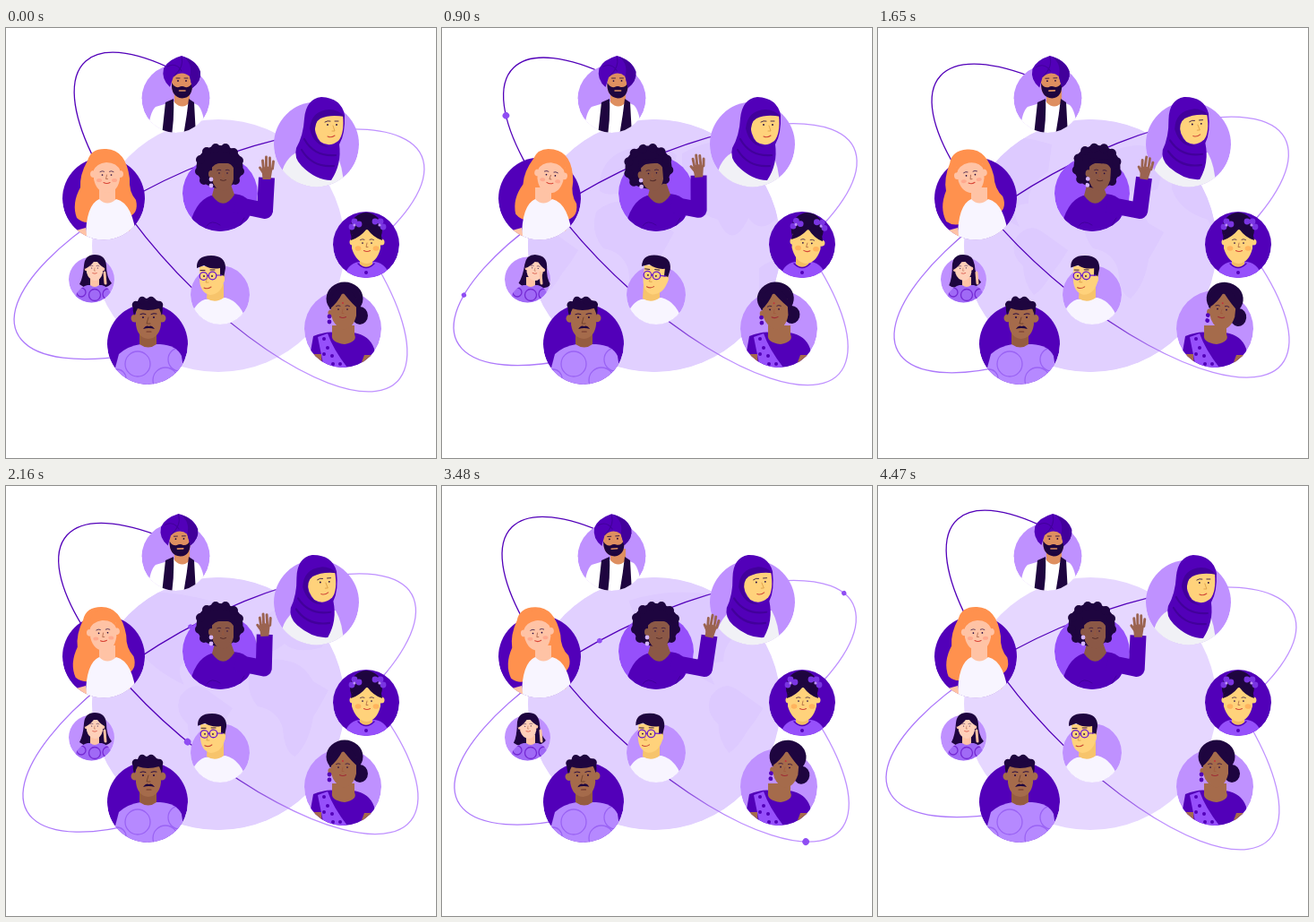
Animation, 480 px wide and 480 px high, one loop 4.5 s. Source, as an HTML page:

```html
<!DOCTYPE html>
<html lang="en">
<head>
<meta charset="utf-8">
<title>People around the globe</title>
<style>
  html, body { margin: 0; width: 100%; height: 100%; overflow: hidden; background: #fff; }
  svg { display: block; width: 100%; height: 100%; }
</style>
</head>
<body>
<svg id="stage" viewBox="0 0 480 480"></svg>
<script>
const LOOP = 4500, TAU = Math.PI * 2;
const DARK = '#5200b9', DEEP = '#42009b', MID = '#9650fb', LIGHT = '#bf91ff', INK = '#1e053f';
const SUN = '#ffd27b', PEACH = '#ffc3a5', TAN = '#de8f60', BROWN = '#8b5846', CLAY = '#a56b4b', WHITE = '#f8f5ff';

// Shape helpers
const path = (d, fill) => `<path d="${d}" fill="${fill}"/>`;
const line = (d, stroke, w = 1) => `<path d="${d}" fill="none" stroke="${stroke}" stroke-width="${w}" stroke-linecap="round" stroke-linejoin="round"/>`;
const oval = (x, y, rx, ry, fill) => `<ellipse cx="${x}" cy="${y}" rx="${rx}" ry="${ry}" fill="${fill}"/>`;
const dots = (list, r, fill) => list.map(([x, y]) => oval(x, y, r, r, fill)).join('');
const rings = (list, stroke) => list.map(([x, y, r]) =>
  `<circle cx="${x}" cy="${y}" r="${r}" fill="none" stroke="${stroke}" stroke-width="1.3"/>`).join('');
const head = (id, art) => `<g id="${id}">${art}</g>`;

// Garment with a ring print that stays inside its outline
const printed = (id, d, fill, list, stroke) => `<clipPath id="${id}"><path d="${d}"/></clipPath>
  ${path(d, fill)}<g clip-path="url(#${id})">${rings(list, stroke)}</g>`;

const face = (x, y, s = 1, lips = '#b5463c') => `<g transform="translate(${x} ${y}) scale(${s})">
  ${dots([[-5, 0], [5, 0]], .85, INK)}
  ${line('M-7.500 -3.500Q-5 -5 -3 -3.800M3 -3.800Q5 -5 7.500 -3.500', INK, .7)}
  ${line('M0 0L-1 4.500H1', '#a0583c', .7)}
  ${line('M-3.500 8.500Q0 10.500 3.500 8.500', lips, 1.1)}</g>`;

// Round badge: art is cut by the lower half of the disc, free above it
const badge = (id, x, y, r, fill, art) => `
  <clipPath id="clip-${id}"><path d="M${x - r} ${y}A${r} ${r} 0 0 0 ${x + r} ${y}H${x + 2 * r}V0H${x - 2 * r}V${y}Z"/></clipPath>
  <g clip-path="url(#clip-${id})">${oval(x, y, r, r, fill)}${art}</g>`;

const people = [
  badge('turban', 189.5, 79, 38, LIGHT,
    path('M158 120Q160 94 167 88L187 82H205L214 86Q221 92 223 120Z', '#fff') +
    path('M188 70H205V83Q197 92 188 83Z', TAN) +
    path('M178 83L187 79Q188 98 185 120H174ZM204 79L210 83L212 120H198Q202 98 204 79Z', INK) +
    head('turban-head',
      path('M185 50H208V67Q206 78 196.500 78Q187 78 185 67Z', TAN) +
      path('M185 61Q188 67 193 66Q196.500 64 200 66Q205 67 208 61Q209 78 196.500 78.500Q184 77 185 61Z', INK) +
      line('M193.500 70H200', TAN, 1.6) +
      dots([[192, 59], [201, 59]], .9, INK) +
      line('M190 56H194M199 56H203', INK, .8) +
      path('M196 31Q181 35 176 45Q173 57 183 66L187 54Q197 47 205 54L208 67Q218 60 217 49Q213 36 196 31Z', DARK) +
      path('M198 32Q209 40 205 54L208 67Q218 60 217 49Q213 37 198 32Z', DEEP) +
      line('M196 32Q199 44 187 54M196 48Q190 38 180 43', DEEP))),

  badge('red', 109, 190.5, 46, DARK,
    head('red-hair', path('M112 135Q95 134 91 148Q82 164 83 178Q73 196 79 212Q90 222 105 212H134Q149 208 145 192Q137 183 138 168Q134 136 112 135Z', '#ff914e')) +
    path('M104 178H122V196Q113 205 104 196Z', PEACH) +
    path('M89 240Q88 198 104 191Q113 200 123 191Q143 196 146 240Z', WHITE) +
    path('M78 226L89 223L91 240H78ZM137 226L147 224V240H138Z', PEACH) +
    head('red-head',
      dots([[98, 163], [127, 163]], 4, PEACH) +
      path('M98 153Q112 143 127 153V169Q124 184 112.500 184Q101 183 98 169Z', PEACH) +
      oval(104, 170, 3, 2, '#ffa98e') + oval(121, 170, 3, 2, '#ffa98e') +
      face(112.5, 164, 1, '#d94436') +
      path('M97 160Q97 140 112 138Q127 140 128 160Q124 150 112 150Q101 151 97 160Z', '#ff914e'))),

  badge('hijab', 346.5, 130, 47.5, LIGHT,
    path('M305 180Q306 149 324 139H368Q377 155 377 180Z', '#f1f1f6') +
    head('hijab-head',
      path('M352 77Q335 79 333 101Q332 120 324 134Q321 145 330 154Q346 170 363 170Q375 152 372 130Q379 118 378 97Q374 78 352 77Z', DARK) +
      path('M344 104Q353 92 376 97Q378 118 371 126Q361 134 351 127Q344 119 344 104Z', SUN) +
      path('M339 112Q341 92 361 91Q371 91 378 99Q362 96 351 101Q344 105 345 118Q348 129 361 133Q343 132 339 112Z', DEEP) +
      line('M330 136Q342 156 366 154M333 124Q344 144 368 142', DEEP, 2.2) +
      dots([[359, 108], [369, 108]], .9, INK) +
      line('M356 105Q359 103 362 104M367 104L371 104', INK, .8) +
      line('M365 109L367 115H364', '#d99a45', .8) +
      line('M359 121Q363 123 367 120', '#d04a3a', 1.1))),

  badge('afro', 239, 185, 42, MID,
    path('M203 232Q208 194 229 187L253 185Q271 186 274 200L266 232Z', DARK) +
    path('M230 187Q243 205 255 186L250 172H234Z', BROWN) +
    line('M224 221Q229 213 239 220M260 222L266 212', DEEP) +
    head('afro-head',
      oval(238.5, 155, 26, 24, INK) +
      dots([[217, 147], [224, 138], [234, 134], [245, 134], [254, 139], [260, 148], [261, 160], [256, 170], [216, 160], [221, 170]], 5, INK) +
      oval(229, 163, 3, 4, BROWN) +
      path('M230 151H254V169Q251 182 242 182Q232 180 230 169Z', BROWN) +
      path('M228 158Q234 149 243 151Q251 149 255 158V146H228Z', INK) +
      face(242.5, 162, .9, '#542c2a') +
      dots([[229, 169], [229, 176]], 2.4, '#d4b5ff'))) +
    `<path id="arm" fill="none" stroke="${DARK}" stroke-width="18" stroke-linejoin="round"/>
    <g id="hand">${path('M-5 2L-6 -10Q0 -15 6 -10L4 2Z', '#9b6350') +
      line('M-4 -9L-5 -19M-1 -10V-23M3 -10L3 -22M6 -10L7 -18M-4 -5L-8 -11', '#9b6350', 2.9)}</g>`,

  badge('girl', 402, 242, 37, DARK,
    path('M377 284Q378 264 394 261H412Q428 264 429 284Z', MID) +
    path('M395 254H409V264Q402 271 395 264Z', '#f3bd62') +
    line('M393 263Q402 272 411 263', DARK, 1.4) + dots([[402, 273]], 2, DARK) +
    head('girl-head',
      oval(402, 225, 18, 19, INK) +
      dots([[387, 239], [419, 239]], 3.5, SUN) +
      path('M386 231Q402 219 418 231V246Q414 262 402.500 263Q391 262 386 246Z', SUN) +
      path('M385 237Q386 221 402 219Q418 221 420 237Q410 234 403 224Q395 234 385 237Z', INK) +
      oval(393, 246, 3.4, 2.8, '#ffb45e') + oval(413, 246, 3.4, 2.8, '#ffb45e') +
      face(403, 240, 1, '#d34538') +
      dots([[386, 222], [389, 216], [394, 219], [412, 216], [418, 216], [421, 222]], 3.4, '#7a35e2') +
      dots([[389, 220], [417, 220]], 1.6, LIGHT))),

  badge('glasses', 239, 298, 33, LIGHT,
    path('M204 336Q206 309 222 303L245 301Q264 306 270 334Z', WHITE) +
    path('M225 286H243V301Q234 308 224 302Z', '#f7c46b') +
    head('glasses-head',
      path('M216 266H244V280Q241 297 228 298Q217 296 216 281Z', SUN) +
      path('M213 268Q212 254 229 254Q245 254 245 268L243 279L239 278V268Q229 270 221 265Z', INK) +
      oval(241, 280, 3, 4, SUN) +
      rings([[220.5, 277, 4.3], [230.5, 276.5, 4.3]], '#6a1dcc') +
      line('M224.800 276.500H226.200M235 276H241', '#6a1dcc', 1.2) +
      dots([[221, 277], [230, 277]], .9, INK) +
      line('M217 270.500H222M228 270H233', INK, .9) +
      line('M225 278L223 284H226', '#d99a45', .8) +
      line('M221 290Q225 292 229 289', '#c94a36', 1.1))),

  badge('sari', 376, 336, 43, LIGHT,
    path('M336 384L343 344Q358 338 368 340H388Q406 343 411 358L412 384Z', DARK) +
    path('M341 364H352L353 384H338ZM400 365H414V384H393Z', CLAY) +
    path('M364 332H389V342Q393 350 378 353Q362 351 364 342Z', CLAY) +
    path('M348 345L359 341Q366 361 385 384H356Q351 360 348 345Z', MID) +
    dots([[355, 347], [359, 357], [355, 364], [364, 366], [365, 375], [373, 375]], 2, DARK) +
    head('sari-head',
      oval(395, 321, 9, 10, INK) + oval(378, 302, 20.5, 18.5, INK) +
      dots([[363, 318]], 3.6, CLAY) +
      path('M363 303Q378 290 391 303V321Q388 335 377 337Q366 333 363 321Z', CLAY) +
      path('M361 314Q362 292 376 290Q391 292 394 314Q388 310 376 295Q370 307 361 314Z', INK) +
      face(376, 314, 1, '#a02c35') + dots([[376, 307]], 1, '#c2323c') +
      dots([[361, 322], [361, 328]], 2.4, DARK))),

  badge('man', 158, 353, 45, DARK,
    printed('shirt', 'M116 402L126 364Q136 355 150 353H172Q190 354 196 366L201 402Z', '#b689ff',
      [[147, 375, 14], [178, 393, 14], [194, 370, 13], [124, 391, 10]], '#9a63f4') +
    path('M149 339H168V353Q159 360 149 353Z', '#955c40') +
    head('man-head',
      dots([[144, 324], [174, 324]], 4.5, CLAY) +
      path('M145 312H173V331Q171 346 159 347Q147 346 145 331Z', CLAY) +
      path('M143 321Q139 307 147 305Q149 299 157 302Q164 298 168 304Q177 306 174 321L171 313Q158 317 147 313Z', INK) +
      dots([[145, 309], [152, 304], [162, 304], [171, 309]], 4.3, INK) +
      dots([[153, 323], [165, 323]], 1, INK) +
      line('M150 319.500Q153 318 156 319.500M162 319.500Q165 318 168 319', INK, .9) +
      line('M159 323L157 330H161', '#70412d', .9) +
      path('M153 336Q156 331 159.500 333Q163 331 166 336Q159 334 153 336Z', INK) +
      line('M157 339H162', '#70342d', 1.1))),

  badge('small', 95.5, 281, 25.5, LIGHT,
    head('small-hair', path('M99 253Q88 253 87 265Q86 279 82 286Q90 293 99 286Q111 293 118 285Q112 278 112 265Q111 253 99 253Z', INK)) +
    printed('blouse', 'M75 310Q77 291 91 287H107Q119 290 120 310Z', '#a06af6',
      [[99, 298, 6.5], [84, 295, 5], [114, 297, 6]], '#7429d4') +
    path('M94 278H104V287Q99 291 94 287Z', PEACH) +
    head('small-head',
      dots([[90, 269], [108, 269]], 2.3, PEACH) +
      path('M90 261H108V273Q106 282 99 282Q92 281 90 273Z', '#ffd0b9') +
      path('M88 269Q88 255 99 254Q109 255 110 268Q104 265 100 258Q95 266 88 269Z', INK) +
      face(99, 268, .66, '#d34538')) +
    line('M110 273L111 285', PEACH, 3))
];

const orbits = [
  { a: 249.4, b: 90.5, from: [262, 216.5, 45.7], to: [259.3, 215, 39.6],
    start: Math.PI + .85, end: -1, sweep: 0, stops: [[.5, DARK], [.58, DARK], [.8, LIGHT]] },
  { a: 246.5, b: 90, from: [238, 241.3, -23.5], to: [238.2, 242, -29.4],
    start: -Math.PI - .95, end: .95, sweep: 1, stops: [[.2, '#ad79fb'], [.38, DARK], [.68, DARK], [.88, LIGHT]] }
];

const orbitMarkup = ({ a, b, start, end, sweep, stops }, i) => {
  const at = u => `${a * Math.cos(u)} ${b * Math.sin(u)}`;
  return `<linearGradient id="fade${i}" gradientUnits="userSpaceOnUse" x1="${-a}" y1="0" x2="${a}" y2="0">
    ${stops.map(([o, c]) => `<stop offset="${o}" stop-color="${c}"/>`).join('')}</linearGradient>
    <g id="orbit${i}"><path id="track${i}" d="M${at(start)}A${a} ${b} 0 1 ${sweep} ${at(end)}"
    fill="none" stroke="url(#fade${i})" stroke-width="1.3"/></g>`;
};

const land = [
  'M100 205Q118 188 145 196Q160 200 170 218L187 228Q178 245 170 258Q166 286 150 302Q138 298 136 270Q130 250 108 246Q93 228 100 205Z',
  'M104 182Q102 150 128 138Q165 122 190 142L180 180Q150 188 138 176Q120 192 104 182Z',
  'M22 234Q36 216 52 228L80 248Q72 262 62 274Q52 292 42 298Q30 284 30 266Q14 252 22 234Z',
  'M-70 128Q-10 108 62 130L58 160Q34 176 36 196Q12 196 26 222Q-8 206 -28 180Q-60 160 -70 128Z',
  'M196 140Q250 110 330 134Q336 180 304 210Q284 232 270 212Q252 250 236 214Q204 204 196 180Z',
  'M282 268Q304 250 330 266Q340 290 322 302Q296 296 282 300Z'
];

const $ = id => document.getElementById(id);
$('stage').innerHTML = `
  <clipPath id="globe"><circle cx="237" cy="243" r="141"/></clipPath>
  ${oval(237, 243, 141, 141, '#e6d7ff')}
  <g id="earth" clip-path="url(#globe)">
    ${oval(237, 243, 141, 141, '#e1d0ff')}
    <g id="land">${path(land.join(''), '#ddcaff')}</g>
  </g>
  ${orbits.map(orbitMarkup).join('')}${people.join('')}`;

// Periodic smooth curve through a few knots
const curve = (times, values, period) => {
  const n = times.length;
  const k = j => times[(j + n) % n] + period * Math.floor(j / n);
  const v = j => values[(j + n) % n];
  const slope = j => (v(j + 1) - v(j - 1)) / (k(j + 1) - k(j - 1));
  return time => {
    const t = time % period;
    let i = n - 1;
    while (times[i] > t) i--;
    const h = k(i + 1) - k(i), x = (t - k(i)) / h, y = 1 - x;
    return y * y * ((1 + 2 * x) * v(i) + x * h * slope(i)) +
           x * x * ((3 - 2 * x) * v(i + 1) - y * h * slope(i + 1));
  };
};
const twice = (...values) => curve([0, 660, 900, 1230, 1650, 2160], values, LOOP / 2);
const once = (...values) => curve([0, 900, 1650, 2160, 2910, 3480], values, LOOP);

// ids, neck pivot, distance from pivot to face, sideways shift of the face
const redSway = twice(0, 7, 9, -6, -9, -4), smallSway = twice(0, 6, 5, -3, -4, 0);
const sways = [
  ['turban-head', 196, 98, 38, twice(0, 1, -.5, -5, -3, -2.5)],
  ['red-hair', 112, 200, 36, redSway],
  ['red-head', 112, 200, 36, redSway],
  ['hijab-head', 350, 166, 56, once(0, 0, -8, -8, -4, -8)],
  ['afro-head', 242, 206, 50, twice(0, -7, -8, 0, 6, 0)],
  ['girl-head', 402, 278, 40, twice(0, 4, 5, 0, 0, 0)],
  ['glasses-head', 234, 316, 40, twice(0, 8, 9, 3, 2, 1)],
  ['sari-head', 377, 354, 40, twice(0, -6, -5, 7, 8, 0)],
  ['man-head', 159, 356, 32, twice(0, -1, -1, -2, 1, 0)],
  ['small-hair', 99, 298, 30, smallSway],
  ['small-head', 99, 294, 26, smallSway]
].map(([id, x, y, reach, shift]) => ({ el: $(id), x, y, reach, shift }));
const wave = twice(0, -10, -6, 10, 8, -3);

// Travelling dots: orbit, radius, start time, start distance, speed
const travellers = [[0, 3.8, 0, 7, .181], [1, 2.7, 0, 18, .189], [1, 2.8, 2900, 295, .16]]
  .map(([orbit, r, begin, offset, speed]) => {
    const el = document.createElementNS('http://www.w3.org/2000/svg', 'circle');
    el.setAttribute('fill', '#8f4df3');
    $('orbit' + orbit).append(el);
    const track = $('track' + orbit);
    return { el, track, r, begin, offset, speed, length: track.getTotalLength() };
  });

const set = (el, attrs) => { for (const name in attrs) el.setAttribute(name, attrs[name]); };
const clamp = x => Math.max(0, Math.min(1, x));
const smooth = x => x * x * (3 - 2 * x);

function draw(t) {
  const tilt = smooth(clamp(2.24 * Math.min(t, LOOP - t) / LOOP));
  orbits.forEach(({ from, to }, i) => {
    const [x, y, angle] = from.map((v, j) => v + (to[j] - v) * tilt);
    set($('orbit' + i), { transform: `translate(${x} ${y}) rotate(${angle})` });
  });
  for (const { el, track, r, begin, offset, speed, length } of travellers) {
    const p = track.getPointAtLength(Math.min(length, offset + speed * Math.max(0, t - begin)));
    set(el, { cx: p.x, cy: p.y, r: r * clamp((t - begin) / 250) });
  }
  set($('earth'), { opacity: clamp(t / 700) * clamp((4400 - t) / 600) });
  set($('land'), { transform: `translate(${.08 * t} 0)` });
  // Heads half slide, half tilt
  for (const { el, x, y, reach, shift } of sways) {
    const half = shift(t) / 2;
    set(el, { transform: `translate(${half} 0) rotate(${half / reach * 360 / TAU} ${x} ${y})` });
  }

  const dx = wave(t), lift = Math.min(0, dx) * .4;
  set($('arm'), { d: `M256 197L${289 + dx * .4} ${204 + lift * .5}L${291 + dx * .75} ${167 + lift}` });
  set($('hand'), { transform: `translate(${291.5 + dx * .75} ${167 + lift}) rotate(${dx})` });
}

const origin = performance.now();
(function tick() {
  draw((performance.now() - origin) % LOOP);
  requestAnimationFrame(tick);
})();
</script>
</body>
</html>
```
